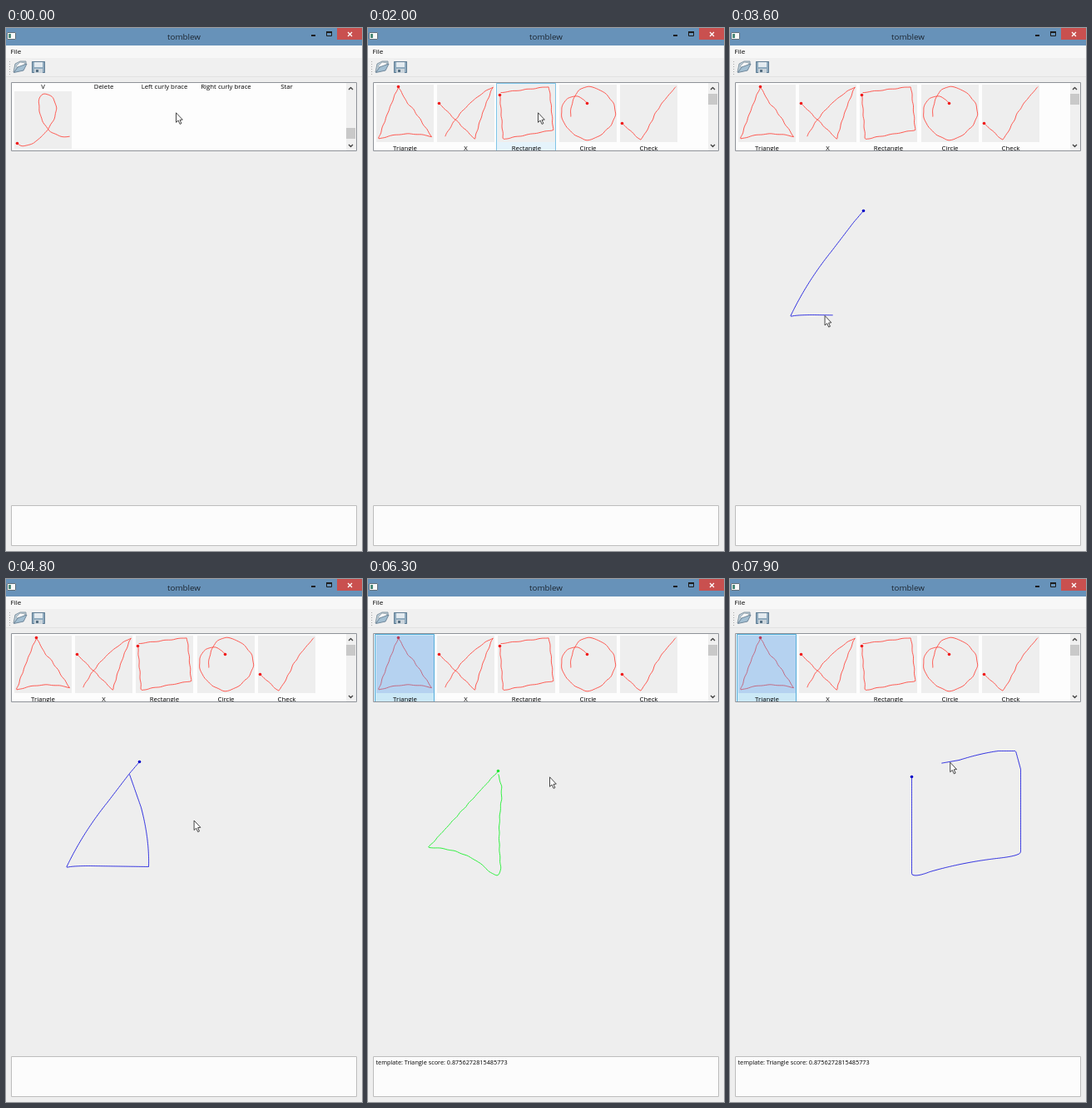
Recreate the animation shown at these times as an HTML page with a canvas. Size 428 px wide and 628 px high, loop 8000 ms.

```html
<!DOCTYPE html>
<html lang="en">
<head>
<meta charset="utf-8">
<style>
html, body { margin: 0; width: 100%; height: 100%; overflow: hidden; background: #eee; }
canvas { display: block; }
</style>
</head>
<body>
<canvas id="stage" width="428" height="628"></canvas>
<script>
const ctx = document.getElementById('stage').getContext('2d');
const LOOP = 8000, STEP = 100, COL = 73.2, ROW = 82, MAX_SCROLL = 238;

// Samples a path every 2 px, with a slight hand tremor
function trace(d, tremor = 0) {
  const path = document.createElementNS('http://www.w3.org/2000/svg', 'path');
  path.setAttribute('d', d);
  const n = Math.round(path.getTotalLength() / 2);
  return Array.from({ length: n + 1 }, (_, i) => {
    const p = path.getPointAtLength(path.getTotalLength() * i / n);
    return [p.x + .5 + tremor * Math.sin(i * .9), p.y + .5 + tremor * Math.sin(i * .7)];
  });
}

// Templates inside 69 x 69 tiles
const gestures = Object.entries({
  'Triangle': 'M26,2Q14,30 2,65Q34,54 66,62L44,29 37,22 26,2',
  'X': 'M2,22L45,65Q54,30 67,2Q30,22 9,62',
  'Rectangle': 'M2,12L6,65 66,54Q64,24 61,2L3,9',
  'Circle': 'M33,22C21,6 2,14 2,33S24,66 34,66 67,50 67,33 48,2 34,2 13,20 13,38',
  'Check': 'M2,46L24,66Q32,56 40,38 48,22 67,2',
  'Caret': 'M2,66Q22,26 39,3C46,8 48,54 66,61',
  'Question': 'M2,11Q34,-2 61,3C70,8 70,28 48,37S22,50 26,67',
  'Arrow': 'M2,66L65,4 38,10 66,3 65,38',
  'left square bracket': 'M67,2L3,7 9,66 60,63',
  'Right square bra...': 'M3,9L62,2Q72,6 64,63L9,67',
  'V': 'M2,3L33,66 66,2',
  'Delete': 'M3,4L66,64 3,65 65,3',
  'Left curly brace': 'M48,2C20,2 48,34 19,35C48,36 20,66 49,66',
  'Right curly brace': 'M20,2C48,2 20,34 49,35C20,36 48,66 19,66',
  'Star': 'M8,66L34,2 58,66 2,25 67,26Z',
  'Pigtail': 'M3,62C18,76 50,40 50,21S29,-6 29,14 40,56 66,54'
}).map(([label, d]) => ({ label, points: trace(d, .35) }));

const drawnTriangle = trace('M160,219L148,233 122,267Q92,304 72,346Q78,344 100,344L171,345Q172,312 162,274L148,234');
const matchedTriangle = trace('M156,230L72,322Q108,322 136,342C152,358 158,360 159,346Q155,300 160,264L160,248 156,234', .3);
const drawnSquare = trace('M218,237V354Q222,358 240,351 278,340 320,335 349,332 349,327V228L343,206H322Q300,209 275,217L246,222');

// Pointer stops: time, x, y
const stops = [
  [2300, 204, 101], [2800, 149, 233], [3000, 160, 219], [4400, 148, 234],
  [4900, 245, 303], [5500, 244, 303], [5900, 189, 265], [6300, 218, 237]
];

const ramp = (t, from, to) => Math.min(1, Math.max(0, (t - from) / (to - from)));

function pointerAt(t) {
  let [, x, y] = stops[0];
  for (let i = 1; i < stops.length; i++) {
    const f = ramp(t, stops[i - 1][0], stops[i][0]);
    x += (stops[i][1] - stops[i - 1][1]) * f;
    y += (stops[i][2] - stops[i - 1][2]) * f;
  }
  return [x, y];
}

function rect(x, y, w, h, fill, border) {
  ctx.fillStyle = fill;
  ctx.fillRect(x, y, w, h);
  if (border) {
    ctx.strokeStyle = border;
    ctx.lineWidth = 1;
    ctx.strokeRect(x + .5, y + .5, w - 1, h - 1);
  }
}

function text(s, x, y, size, align = 'left', color = '#000') {
  ctx.font = `500 ${size}px "Open Sans", "Noto Sans", sans-serif`;
  ctx.textAlign = align;
  ctx.fillStyle = color;
  ctx.fillText(s, x, y);
}

function line(pts, color, width = 1, fill) {
  ctx.beginPath();
  pts.forEach(p => ctx.lineTo(...p));
  if (fill) {
    ctx.closePath();
    ctx.fillStyle = fill;
    ctx.fill();
  }
  ctx.strokeStyle = color;
  ctx.lineWidth = width;
  ctx.lineJoin = 'round';
  ctx.stroke();
}

function stroke(pts, color, dot) {
  line(pts, color);
  ctx.beginPath();
  ctx.arc(...pts[0], 1.8, 0, 7);
  ctx.fillStyle = dot;
  ctx.fill();
}

function drawWindow() {
  rect(0, 0, 428, 628, '#eee');
  rect(0, 0, 428, 21, '#6792b9');
  text('tomblew', 214, 14, 9.8, 'center', '#1c2530');
  rect(1, 5, 11, 9, '#f8f8f8', '#60707c');
  rect(3, 7, 3, 5, '#4d8a78');
  rect(367, 8, 5, 2, '#1c1c1c');
  rect(385, 4, 7, 6, '#6792b9', '#1c1c1c');
  rect(385, 4, 7, 2, '#1c1c1c');
  rect(398, 0, 30, 14, '#c9504f');
  line([[411, 5], [416, 10]], '#fff', 1.3);
  line([[416, 5], [411, 10]], '#fff', 1.3);

  rect(0, 21, 428, 15, '#f7f7f7');
  text('File', 5.5, 30.7, 8);
  rect(0, 36, 428, 22, '#f0f0f0');
  rect(0, 58, 428, 1, '#e2e2e2');
  for (let y = 40; y < 56; y += 3) rect(4, y, 1, 1, '#aaa');

  line([[9, 53], [11, 43], [17, 40], [24, 40], [24, 44]], '#8496a3', 1, '#bccdd8');
  line([[12, 46], [17, 41], [23, 42], [19, 50]], '#9aa6ae', .8, '#f8f8f8');
  line([[9.5, 53.5], [14, 47], [25, 43], [21, 51]], '#70879a', 1, '#a3bfd2');
  rect(31, 40, 16, 14, '#8faabe', '#5f7c93');
  rect(34, 41, 10, 6, '#e4ebf0');
  rect(34, 49, 10, 5, '#ccd5dc');
  rect(36, 50, 3, 3, '#566f82');

  rect(6, 573, 416, 49, '#fcfcfc', '#bdbdbd');
}

function drawList(scroll, mouse, selected) {
  rect(6, 65, 416, 83, '#fdfdfd', '#8e9298');
  ctx.save();
  ctx.beginPath();
  ctx.rect(7, 66, 402, 81);
  ctx.clip();
  const inside = mouse[1] > 66 && mouse[1] < 147;
  const hover = inside ? Math.floor((mouse[1] - 67 + scroll) / ROW) * 5 + Math.floor((mouse[0] - 8) / COL) : -1;

  gestures.forEach(({ label, points }, i) => {
    const x = Math.round(8 + i % 5 * COL);
    const y = Math.round(66 + Math.floor(i / 5) * ROW - scroll);
    if (i === selected) rect(x, y, 72, ROW, '#cbe8f6', '#55aedb');
    else if (i === hover) rect(x, y, 72, ROW, '#e5f3fb', '#80c4e6');
    rect(x + 2, y + 2, 69, 69, '#eee');
    stroke(points.map(p => [p[0] + x + 2, p[1] + y + 2]), '#ff5850', '#f01818');
    if (i === selected) rect(x + 2, y + 2, 69, 69, 'rgba(51,145,245,.3)');
    text(label, x + 36.5, y + 80.5, 7.8, 'center');
  });
  ctx.restore();

  rect(409, 66, 12, 81, '#f0f0f0');
  rect(409, 79 + Math.round(scroll / MAX_SCROLL * 41), 11, 13, '#c9c9c9');
  line([[412, 74], [414.5, 71.5], [417, 74]], '#444', 1.4);
  line([[412, 140], [414.5, 142.5], [417, 140]], '#444', 1.4);
}

function drawPointer([x, y]) {
  const shape = [[0, 0], [0, 11.5], [2.6, 9.2], [4.6, 13.6], [6.4, 12.8], [4.5, 8.6], [7.8, 8.3], [0, 0]];
  line(shape.map(p => [x + .5 + p[0], y + .8 + p[1]]), '#333', .9, '#fff');
}

function render(t) {
  const matched = t >= 5000;
  const scroll = MAX_SCROLL - 158 * ramp(t, 400, 1000) - 80 * ramp(t, 1200, 1400);
  let mouse = pointerAt(t);
  let ink = null;

  // The pointer trails the ink while the pen moves
  function pen(path, progress) {
    const end = Math.round((path.length - 1) * progress);
    ink = path.slice(0, end + 1);
    if (progress < 1) mouse = path[Math.max(0, end - 5)];
  }
  if (t >= 7000) pen(drawnSquare, ramp(t, 7000, 7910) ** 1.5);
  else if (t >= 3200 && !matched) {
    pen(drawnTriangle, ramp(t, 3170, 3940));
    if (t >= 3940 && t < 4400) mouse = ink[ink.length - 1];
  }

  drawWindow();
  drawList(scroll, mouse, matched ? 0 : -1);
  if (ink) stroke(ink, '#3030e0', '#0000c8');
  else if (matched) stroke(matchedTriangle, '#30f040', '#20e830');
  if (matched) text('template: Triangle score: 0.8756272815485773', 9.5, 583.2, 7.3);
  drawPointer(mouse);
}

function tick() {
  render(Math.floor(performance.now() % LOOP / STEP) * STEP);
  requestAnimationFrame(tick);
}
tick();
</script>
</body>
</html>
```
